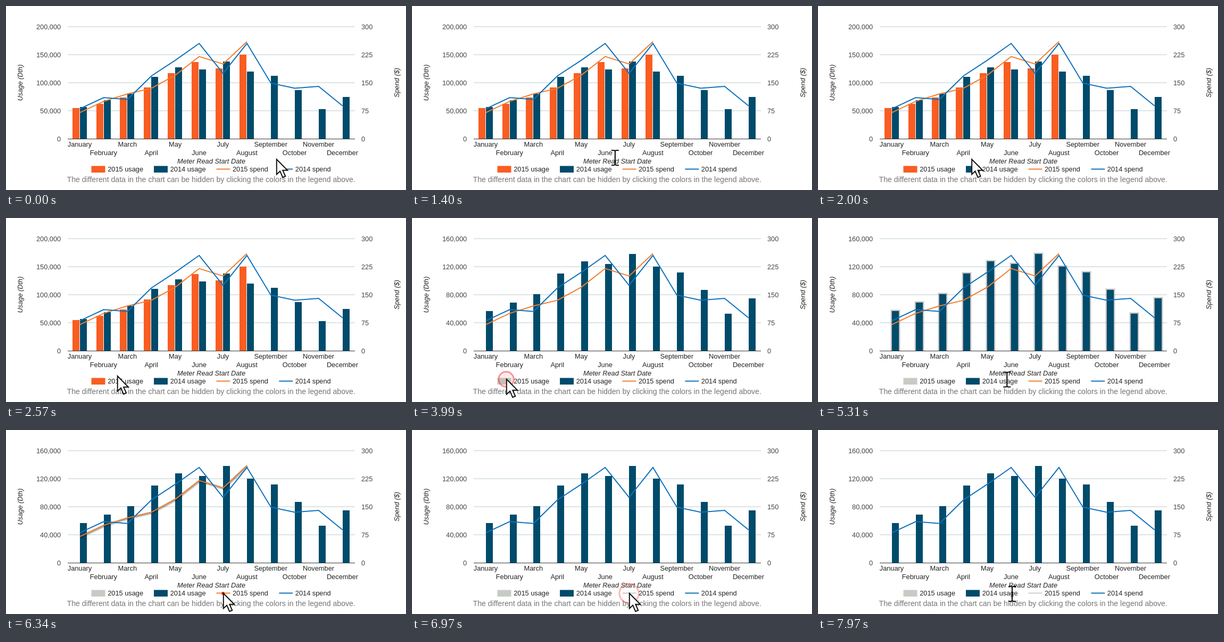
An HTML page for the animation above (8 s loop, 752 by 348 pixels).

```html
<!DOCTYPE html>
<html lang="en">
<head>
<meta charset="utf-8">
<title>Usage and spend chart</title>
<style>
html, body { margin: 0; width: 100%; height: 100%; overflow: hidden; background: #fff; }
svg { display: block; width: 752px; height: 348px; font: 12.8px "Liberation Sans", Arial, sans-serif; fill: #222; }
.axis { fill: #444; }
.title { font-style: italic; }
.note { font-size: 14.14px; fill: #757575; }
.mid { text-anchor: middle; }
.end { text-anchor: end; }
.line { fill: none; stroke-width: 2; }
.glow { fill: none; stroke: #000; }
</style>
</head>
<body>
<svg viewBox="0 0 752 348">
  <g id="chart"></g>
  <circle id="ripple" fill="#e33" stroke="#e33" stroke-width="3"/>
  <path id="arrow" d="M.8 0V28.4L7.2 22.4L12.2 34.2L17.3 32L12.3 20.8H21.2Z" fill="#fff" stroke="#111" stroke-width="2"/>
  <path id="beam" d="M-7-14H-2L0-13L2-14H7M-7 14H-2L0 13L2 14H7M0-13V13" fill="none" stroke="#111" stroke-width="2.2"/>
</svg>
<script>
const $ = id => document.getElementById(id);
const LEFT = 116, RIGHT = 656, BASE = 251, HEIGHT = 212, STEP = 44.9;
const ORANGE = '#f95d22', TEAL = '#004b6b', AMBER = '#f07d2e', BLUE = '#0f71bb';
const months = 'January February March April May June July August September October November December'.split(' ');
const usage15 = [55, 62.5, 73.5, 91.5, 117, 137, 125, 150];
const usage14 = [56.8, 68.6, 80.6, 110, 127.8, 124, 138, 120, 112, 86.7, 53.2, 74.4];
const spend15 = [70, 100, 120, 135, 170, 220, 200, 260];
const spend14 = [80, 110, 105, 168, 210, 255, 175, 255, 149, 135, 140, 88];

const LOOP = 8000, RIPPLE = 720, REACT = 150;
const clicks = [{ at: 3510, x: 177, y: 305 }, { at: 6340, x: 408, y: 309 }];
// time, x, y of the pointer
const path = [
  [500, 508, 290], [1280, 400, 287], [1400, 382, 287], [1830, 316, 286], [2090, 274, 292],
  [2570, 209, 299], [2810, 177, 305], [4230, 177, 305], [4740, 268, 302], [5100, 333, 304],
  [5810, 408, 309], [7820, 408, 309], [7970, 365, 310]
];

const text = (x, y, s, cls = '') => `<text x="${x}" y="${y}" class="${cls}">${s}</text>`;
const rect = (x, y, w, h, fill) => `<rect x="${x}" y="${y}" width="${w}" height="${h}" fill="${fill}"/>`;
const rule = (x1, x2, y, color, w) => `<path d="M${x1} ${y}H${x2}" stroke="${color}" stroke-width="${w}"/>`;
const upright = (x, s) => `<text class="title mid" transform="translate(${x} 145) rotate(-90)">${s}</text>`;
const swatch = (x, color, s) => rect(x, 302.5, 26, 12.5, color) + text(x + 30.7, 313, s);
const stroke = (x, color, s) => rule(x, x + 26, 308.5, color, 2) + text(x + 30.5, 313, s);

function bars(data, x0, max, color, lit) {
  return data.map((v, i) => {
    const x = Math.round(x0 + STEP * i), h = Math.round(v / max * HEIGHT), y = BASE - h;
    const halo = lit ? [0.5, 1.5, 2.5].map(d =>
      `<rect class="glow" x="${x - d}" y="${y - d}" width="${13 + 2 * d}" height="${h + d}" stroke-opacity="${0.35 - d / 10}"/>`) : [];
    return halo.join('') + rect(x, y, 13, h, color);
  }).join('');
}

function line(data, color, lit) {
  const d = 'M' + data.map((v, i) => `${138.7 + STEP * i} ${BASE - v / 300 * HEIGHT}`).join('L');
  const halo = lit ? [2, 4, 6].map(w =>
    `<path class="glow" d="${d}" transform="translate(1 1)" stroke-width="${w}" stroke-opacity=".12"/>`).join('') : '';
  return halo + `<path class="line" d="${d}" stroke="${color}"/>`;
}

function chart(noUsage, noSpend, lit) {
  const max = noUsage ? 160 : 200;
  let s = '';
  for (let i = 0; i < 5; i++) {
    const y = BASE - i * HEIGHT / 4;
    if (i) s += rule(LEFT, RIGHT, y + 0.1, '#b9cccb', 1);
    s += text(103.2, y + 5, i ? max / 4 * i + ',000' : 0, 'axis end') + text(668, y + 5, 75 * i, 'axis');
  }
  if (!noUsage) s += bars(usage15, 124.6, max, ORANGE, lit === 'usage15');
  s += bars(usage14, 138.6, max, TEAL, lit === 'usage14');
  s += rule(LEFT, RIGHT, BASE + 0.5, '#333', 1);
  if (!noSpend) s += line(spend15, AMBER, lit === 'spend15');
  s += line(spend14, BLUE);
  months.forEach((m, i) => s += text(138.5 + STEP * i, i % 2 ? 282 : 266, m, 'mid'));
  s += upright(30.5, 'Usage (Dth)') + upright(738.5, 'Spend ($)');
  s += text(386, 297.5, 'Meter Read Start Date', 'title mid');
  s += swatch(160.5, noUsage ? '#c6ccc4' : ORANGE, '2015 usage') + swatch(278, TEAL, '2014 usage');
  s += stroke(395.5, noSpend ? '#ccc' : AMBER, '2015 spend') + stroke(513.3, BLUE, '2014 spend');
  return s + text(385.7, 333, 'The different data in the chart can be hidden by clicking the colors in the legend above.', 'note mid');
}

function pointer(t) {
  const n = path.findIndex(p => p[0] > t);
  if (n === 0) return path[0].slice(1);
  if (n < 0) return path[path.length - 1].slice(1);
  const a = path[n - 1], b = path[n], k = (t - a[0]) / (b[0] - a[0]);
  return [a[1] + (b[1] - a[1]) * k, a[2] + (b[2] - a[2]) * k];
}

const within = (v, a, b) => v >= a && v <= b;
const overText = (x, y) => y < 292 ? within(x, 322, 450) && y < 290
  : y >= 302.5 && (within(x, 191, 257) || within(x, 309, 375));

let shown;
function draw(t) {
  const [x, y] = pointer(t);
  const [noUsage, noSpend] = clicks.map(c => t >= c.at + REACT);
  const lit = within(t, 2720, 3660) && !noUsage ? 'usage15'
    : within(t, 4740, 5500) && within(x, 278, 375) ? 'usage14'
    : within(t, 5500, 6500) && x >= 396 ? 'spend15' : '';
  const key = [noUsage, noSpend, lit].join();
  if (key !== shown) $('chart').innerHTML = chart(noUsage, noSpend, lit);
  shown = key;

  const click = clicks.find(c => within(t, c.at, c.at + RIPPLE));
  const ripple = $('ripple');
  ripple.style.display = click ? '' : 'none';
  if (click) {
    const p = (t - click.at) / RIPPLE;
    ripple.setAttribute('cx', click.x);
    ripple.setAttribute('cy', click.y);
    ripple.setAttribute('r', 1.5 + 19 * p);
    ripple.setAttribute('stroke-opacity', 1 - 0.75 * p);
    ripple.setAttribute('fill-opacity', 0.8 * (1 - p) ** 2);
  }

  const beam = overText(x, y);
  $('arrow').style.display = beam ? 'none' : '';
  $('beam').style.display = beam ? '' : 'none';
  $(beam ? 'beam' : 'arrow').setAttribute('transform', `translate(${x} ${y})`);
}

const start = performance.now();
function tick() {
  draw((performance.now() - start) % LOOP);
  requestAnimationFrame(tick);
}
tick();
</script>
</body>
</html>
```
